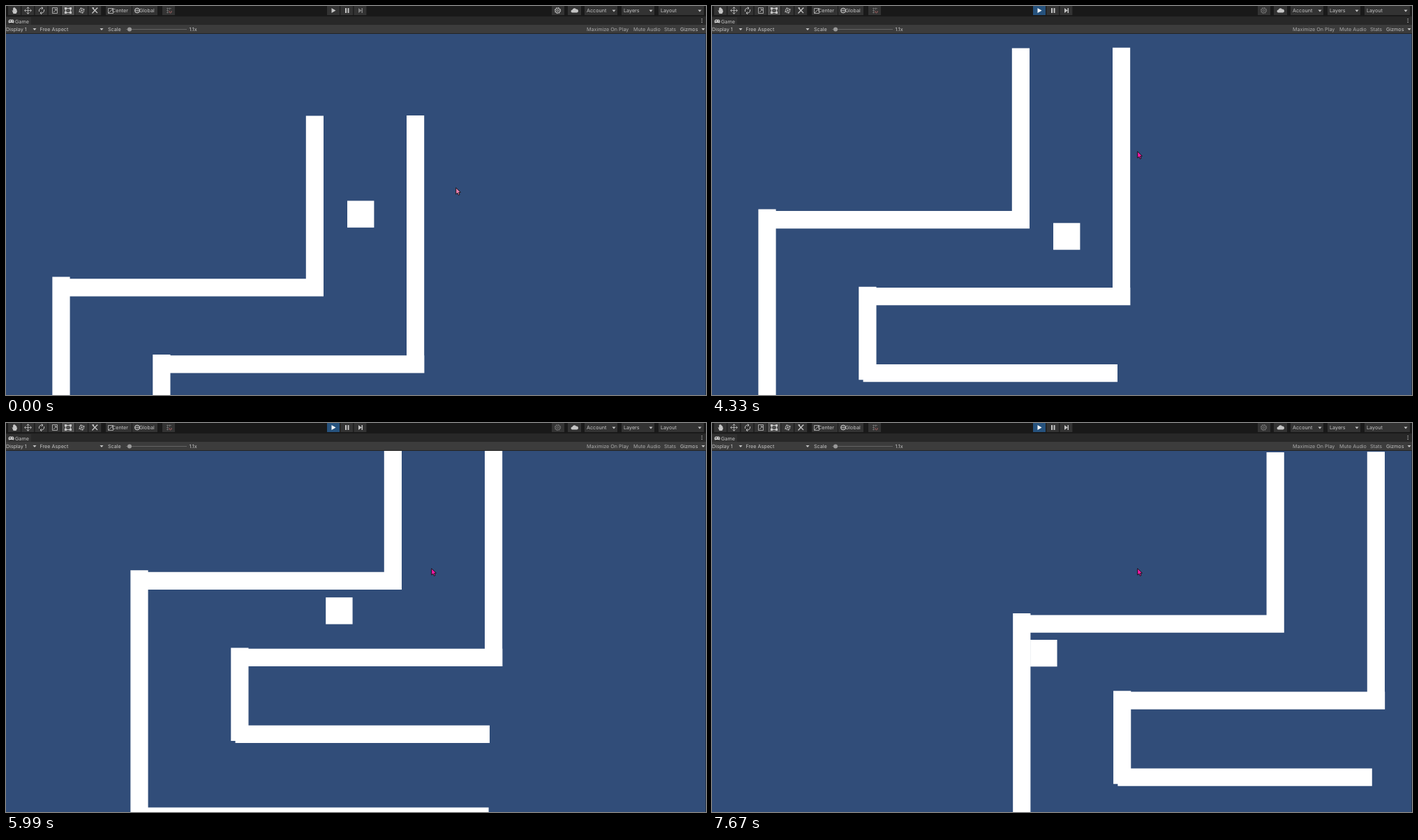
Recreate the animation shown at these times as an HTML page. Size 1003x558 px, loop 8000 ms.

```html
<!DOCTYPE html>
<html>
<head>
<meta charset="utf-8">
<style>
html, body { margin: 0; width: 100%; height: 100%; overflow: hidden; background: #314d79; }
svg { display: block; }
text { font: 7.2px Inter, sans-serif; fill: #c4c4c4; text-rendering: geometricPrecision; }
.line { fill: none; stroke: #c4c4c4; }
.solid { fill: #c4c4c4; stroke: none; }
.button { stroke: #333; stroke-width: 13; }
.option text { fill: #aaa; }
</style>
</head>
<body>
<svg width="1003" height="558" viewBox="0 0 1003 558">
  <rect width="1003" height="558" fill="#314d79"/>
  <path id="walls" fill="none" stroke="#fff" stroke-width="25.2" d="M442.4 157.600V410M80 403.800H455M79 388.600V753.200M73 741.600H579.600
    M586.600 157V520M230 513.800H599.400M222.900 500V633.400M216.600 623.800H581"/>
  <rect id="player" width="38.4" height="38.4" fill="#fff"/>
  <path d="M1002.500 40V558" stroke="#26344b"/>

  <rect width="1003" height="15" fill="#191919"/>
  <rect y="15" width="1003" height="13" fill="#282828"/>
  <rect y="16" width="36" height="12" fill="#303030"/>
  <rect y="27" width="1003" height="13" fill="#3c3c3c"/>
  <path d="M0 39.500H1003" stroke="#232323"/>

  <g class="button">
    <path d="M3 6.500H136.500M460 6.500H517" stroke-dasharray="18 1.200"/>
    <path d="M143 6.500h37m1 0h36m7 0h18M782 6.500h18m5 0h19m5 0h47m6 0h47m6 0h65"/>
    <path d="M80 6.500h18" stroke="#505050"/>
    <path id="playButton" d="M460 6.500h18"/>
  </g>

  <g class="line">
    <path class="solid" d="M8.500 6l1 .2.6 1.400V3q.7-.8 1.200 0V2q.8-.7 1.300 0v1q.8-.6 1.200.2v1q.8-.5 1.200.2L16 8l-1.500 3h-4z"/>
    <path d="M27 6.500h9M31.500 2v9M29.500 3.500l2-2 2 2M29.500 9.500l2 2 2-2M28.500 4.500l-2 2 2 2M34.500 4.500l2 2-2 2" stroke-width=".8"/>
    <path d="M47.500 8a4 4 0 0 1 5-5M54.500 5a4 4 0 0 1-5 5M51 1.500l2 1.500-2 2M51 8.500l-2 1.500 2 2"/>
    <path d="M66.500 2.500h7v8h-7zM68 9l4-4M69.500 4.500H72V7" stroke-width=".8"/>
    <path d="M85.500 3.500h7v6h-7z"/>
    <path class="solid" d="M84 2h3v3h-3zM91 2h3v3h-3zM84 8h3v3h-3zM91 8h3v3h-3z"/>
    <path d="M104 8.500l9-4M107 2l3 9M105.200 6.500a3.300 3.300 0 1 1 6.600 0a3.300 3.300 0 1 1-6.600 0" stroke-width=".8"/>
    <path d="M124 3l7 7M131 2.500l-7.500 8M123.500 2.500l2.500.5M129 4l2.500-1" stroke-width="1.300"/>
    <path d="M146.500 3.500h7v7h-7zM147 10l6-6" stroke-width=".8"/>
    <circle cx="188" cy="6.500" r="3.500"/>
    <path d="M184.500 6.500h7M188 3v7M186 3.500q-1.500 3 0 6M190 3.500q1.500 3 0 6" stroke-width=".6"/>
    <path d="M230 3.500h7M230 6.500h3M230 9.500h3M231.500 2.500v8M234.500 2.500v3" stroke="#777" stroke-width=".7"/>
    <path d="M234 7v2q1.500 2 3 0V7" stroke="#a06060"/>
    <g id="gear">
      <circle cx="790.500" cy="6.500" r="3.500"/>
      <circle cx="790.500" cy="6.500" r="1.400"/>
      <circle cx="790.500" cy="6.500" r="4.200" stroke-dasharray="1.650"/>
    </g>
    <path d="M172 33.500H259" stroke="#646464"/>
  </g>
  <g class="solid">
    <path id="play" d="M466.500 3v7l6-3.500z"/>
    <path d="M486 3h2v7h-2zM489.500 3h2v7h-2z"/>
    <path id="step" d="M505 3v7l4.500-3.500zM509.500 3h1.500v7h-1.500z"/>
    <path d="M811.500 9.500a2 2 0 0 1 0-4 3 3 0 0 1 5.500-.8 2.400 2.400 0 0 1 1 4.800z"/>
    <circle cx="177" cy="33.500" r="3" fill="#999"/>
    <path d="M5.500 19.500h4q2 0 2 3t-2 1.500H5.500q-2 1.500-2-1.500t2-3z"/>
    <path d="M5 21.500h2M9 21.500h1" stroke="#333"/>
    <path d="M997.100 18v7" stroke="#c4c4c4" stroke-width="1.200" stroke-dasharray="1.200"/>
    <path d="M868.500 5.500h5l-2.500 3zm53 0h5l-2.500 3zm70 0h5l-2.500 3zM38.500 32h5l-2.500 3zm96 0h5l-2.500 3zm862 0h5l-2.500 3z"/>
  </g>
  <text y="9.400" x="152">Center</text>
  <text y="9.400" x="191">Global</text>
  <text y="9.400" x="832">Account</text>
  <text y="9.400" x="885">Layers</text>
  <text y="9.400" x="938">Layout</text>
  <text y="24.600" x="13">Game</text>
  <text y="36" x="0">Display 1</text>
  <text y="36" x="48.500">Free Aspect</text>
  <text y="36" x="146">Scale</text>
  <text y="36" x="262.500">1.1x</text>
  <text y="36" x="966">Gizmos</text>
  <g class="option">
    <text y="36" x="832">Maximize On Play</text>
    <text y="36" x="899">Mute Audio</text>
    <text y="36" x="943">Stats</text>
  </g>
  <path id="cursor" d="M.7.700V10L2.900 8.200 4.300 11.300 6 10.600 4.700 7.500 7.400 7.200z" stroke="#111" stroke-width=".9"/>
</svg>
<script>
const set = (id, attrs) => {
  for (const name in attrs) document.getElementById(id).setAttribute(name, attrs[name]);
};

// The player's turning points in the level: [ms, position]
const pathX = [[5000, 489], [6000, 346.2], [6667, 243], [7667, 91.3]];
const pathY = [[3475, 279.4], [5030, 513.2], [5422, 513.2], [6000, 427.6], [6667, 325], [6832, 300], [7667, 426.7]];

function along(path, t) {
  const next = path.findIndex(([time]) => time > t);
  if (next === 0) return path[0][1];
  if (next < 0) return path.at(-1)[1];
  const [[t0, p0], [t1, p1]] = path.slice(next - 1, next + 1);
  return p0 + (p1 - p0) * (t - t0) / (t1 - t0);
}

// The camera closes on the player with a 220 ms time constant.
function follow(path, t) {
  const rest = path[0][1], dt = 4;
  let camera = rest;
  for (let s = path[0][0]; s < t; s += dt) {
    camera += (along(path, s + dt / 2) - camera) * dt / 220;
  }
  return { shift: rest - camera, screen: along(path, t) - camera + rest };
}

// The game view refreshes three times a second, after two late starts.
function viewTime(t) {
  const tick = t < 3540 ? 0 : t < 3900 ? 11 : t < 4322 ? 12 : Math.floor((t + 12) * 3 / 1000);
  return tick * 1000 / 3;
}

// Cursor stops: [ms, x, y]; it is hidden while off stage
const stops = [[0, 644, 260], [830, -20, -20], [1180, 471, 1], [1520, 577, 153], [1850, 609, 208]];

function draw() {
  const t = performance.now() % 8000;
  const x = follow(pathX, viewTime(t)), y = follow(pathY, viewTime(t));
  set('walls', { transform: `translate(${x.shift} ${y.shift})` });
  set('player', { x: x.screen, y: y.screen });

  const [, left, top] = stops.findLast(([time]) => time <= t);
  set('cursor', { transform: `translate(${left} ${top})`, fill: t < 500 ? '#e87fae' : '#f21ba5' });

  const playing = t >= 1520, ready = t >= 3200;
  set('playButton', { stroke: playing ? '#26527d' : t >= 1180 ? '#505050' : '#333' });
  set('play', { fill: playing ? '#fff' : '#c4c4c4' });
  set('step', { fill: ready ? '#c4c4c4' : '#808080' });
  set('gear', { opacity: ready ? 0.45 : 1 });
  requestAnimationFrame(draw);
}
draw();
</script>
</body>
</html>
```
